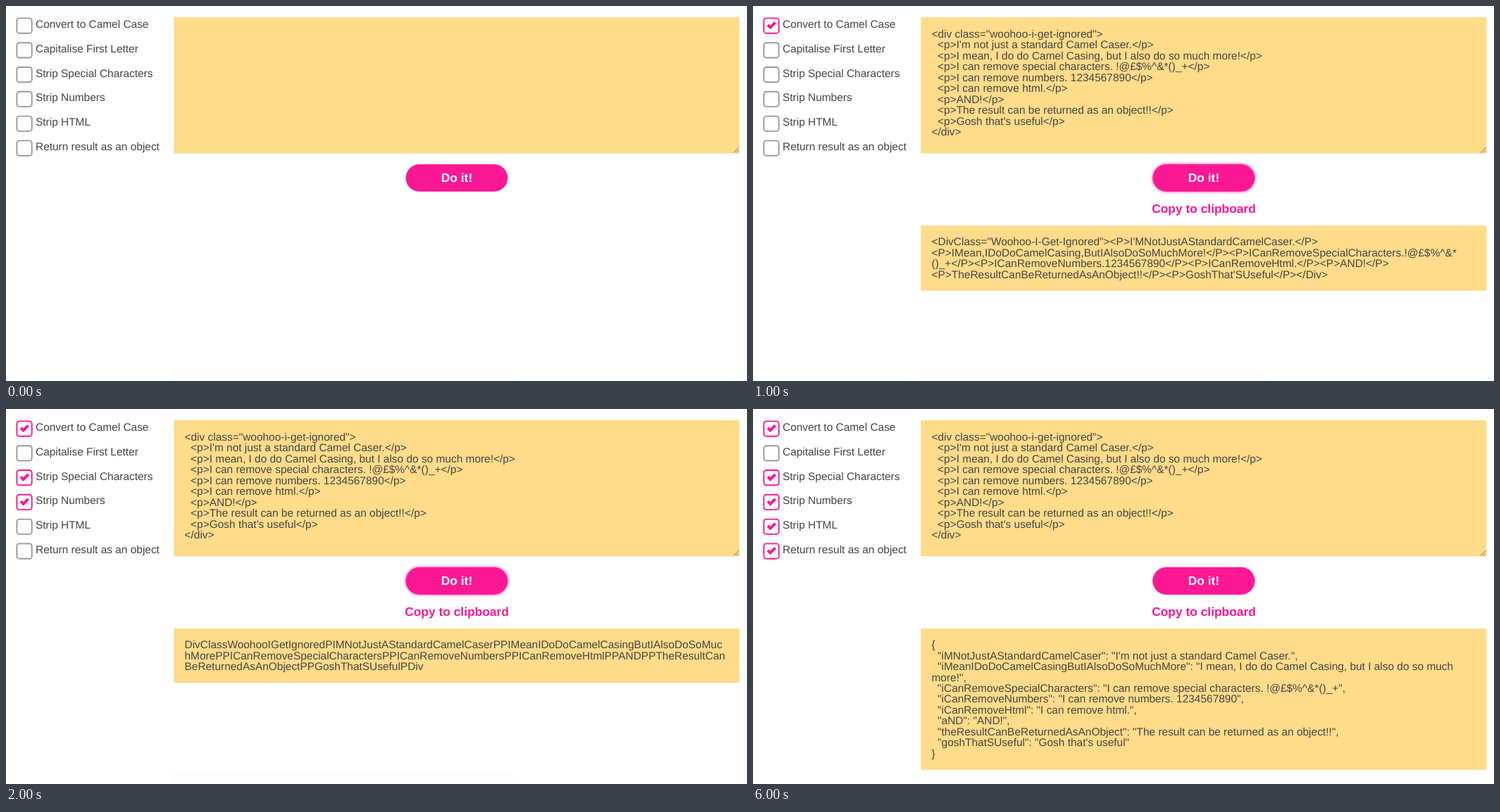
These frames come from a looping animation (1052x533 px, 8 s). An HTML page:

```html
<!DOCTYPE html>
<html lang="en">
<head>
<meta charset="utf-8">
<title>Camel case converter</title>
<style>
  html, body { margin: 0; width: 100%; height: 100%; overflow: hidden; background: #fff; }
  svg { display: block; }
  text {
    font: 15.45px "Liberation Sans", Arial, sans-serif;
    fill: #444; white-space: pre; text-rendering: geometricPrecision;
  }
  .bold { font-size: 17.38px; font-weight: bold; text-anchor: middle; }
  .panel { fill: #ffdb8a; }
  .box { fill: #fff; stroke: #999; stroke-width: 1.9; }
  .tick { fill: none; stroke: #fc1894; stroke-width: 4; visibility: hidden; }
  .on .box { stroke: #fc1894; }
  .on .tick { visibility: visible; }
</style>
</head>
<body>
<svg width="1052" height="533" viewBox="0 0 1052 533">
  <path fill="#fdfdfd" d="M235 517H714L737 532H235Z"/>
  <g id="options"></g>

  <rect class="panel" x="238.3" y="16" width="803" height="193.5"/>
  <path d="M1033 208.5l7-7M1037 208.5l3-3" stroke="#75684a"/>
  <g id="focus">
    <rect x="238" y="15.8" width="803.8" height="194" rx="1" fill="none"
          stroke="#ff58a8" stroke-width="2.8" style="filter:blur(.6px)"/>
    <path d="M297 171v16" stroke="#333"/>
  </g>
  <g id="input"></g>

  <rect id="button" x="567.5" y="225" width="144.8" height="38.7" rx="19.35" fill="#fc1894"/>
  <text class="bold" x="640" y="250" style="fill:#fff">Do it!</text>

  <g id="result">
    <text class="bold" x="640" y="293.5" style="fill:#fc1894">Copy to clipboard</text>
    <rect id="panel" class="panel" x="238.3" y="312" width="803"/>
    <g id="output"></g>
  </g>
</svg>
<script>
const LINE = 15.45, STEP = 500, LOOP = 8000;
const $ = id => document.getElementById(id);

const source = `<div class="woohoo-i-get-ignored">
  <p>I'm not just a standard Camel Caser.</p>
  <p>I mean, I do do Camel Casing, but I also do so much more!</p>
  <p>I can remove special characters. !@£$%^&*()_+</p>
  <p>I can remove numbers. 1234567890</p>
  <p>I can remove html.</p>
  <p>AND!</p>
  <p>The result can be returned as an object!!</p>
  <p>Gosh that's useful</p>
</div>`;

const camel = `<DivClass="Woohoo-I-Get-Ignored"><P>I'MNotJustAStandardCamelCaser.</P>
<P>IMean,IDoDoCamelCasing,ButIAlsoDoSoMuchMore!</P><P>ICanRemoveSpecialCharacters.!@£$%^&*
()_+</P><P>ICanRemoveNumbers.1234567890</P><P>ICanRemoveHtml.</P><P>AND!</P>
<P>TheResultCanBeReturnedAsAnObject!!</P><P>GoshThat'SUseful</P></Div>`;

const noSpecials = `DivClassWoohooIGetIgnoredPIMNotJustAStandardCamelCaserPPIMeanIDoDoCamelCasingButIAlsoDoSoMuc
hMorePPICanRemoveSpecialCharactersPPICanRemoveNumbers1234567890PPICanRemoveHtmlPPANDPPT
heResultCanBeReturnedAsAnObjectPPGoshThatSUsefulPDiv`;

const noNumbers = `DivClassWoohooIGetIgnoredPIMNotJustAStandardCamelCaserPPIMeanIDoDoCamelCasingButIAlsoDoSoMuc
hMorePPICanRemoveSpecialCharactersPPICanRemoveNumbersPPICanRemoveHtmlPPANDPPTheResultCan
BeReturnedAsAnObjectPPGoshThatSUsefulPDiv`;

const noHtml = `iMNotJustAStandardCamelCaserIMeanIDoDoCamelCasingButIAlsoDoSoMuchMoreICanRemoveSpecialCharact
ersICanRemoveNumbersICanRemoveHtmlANDTheResultCanBeReturnedAsAnObjectGoshThatSUseful`;

const asObject = `{
  "iMNotJustAStandardCamelCaser": "I'm not just a standard Camel Caser.",
  "iMeanIDoDoCamelCasingButIAlsoDoSoMuchMore": "I mean, I do do Camel Casing, but I also do so much
more!",
  "iCanRemoveSpecialCharacters": "I can remove special characters. !@£$%^&*()_+",
  "iCanRemoveNumbers": "I can remove numbers. 1234567890",
  "iCanRemoveHtml": "I can remove html.",
  "aND": "AND!",
  "theResultCanBeReturnedAsAnObject": "The result can be returned as an object!!",
  "goshThatSUseful": "Gosh that's useful"
}`;

// Each option and the step at which it gets ticked
const options = [
  ["Convert to Camel Case", 2],
  ["Capitalise First Letter", Infinity],
  ["Strip Special Characters", 3],
  ["Strip Numbers", 4],
  ["Strip HTML", 5],
  ["Return result as an object", 6],
];

// Text shown and strength of the button's glow at each step
const steps = [
  { input: "", output: "", glow: 0 },
  { input: source, output: "", glow: 0 },
  { input: source, output: camel, glow: 1 },
  { input: source, output: noSpecials, glow: .1 },
  { input: source, output: noNumbers, glow: 1 },
  { input: source, output: noHtml, glow: .25 },
  { input: source, output: asObject, glow: .45 },
];

const escapeText = s => s.replace(/&/g, "&amp;").replace(/</g, "&lt;");

function setLines(group, content, baseline) {
  group.innerHTML = content.split("\n").map((line, i) =>
    `<text x="253.5" y="${baseline + i * LINE}">${escapeText(line)}</text>`).join("");
}

$("options").innerHTML = options.map(([label], i) => `
  <g transform="translate(0 ${i * 34.8})">
    <rect class="box" x="15.4" y="17.4" width="21.3" height="21.3" rx="3.5"/>
    <path class="tick" d="M21 26.8l3.6 3.6 7-7"/>
    <text x="42" y="31">${label}</text>
  </g>`).join("");

function show(index) {
  const { input, output, glow } = steps[index];
  [...$("options").children].forEach((row, i) =>
    row.classList.toggle("on", index >= options[i][1]));
  $("focus").style.display = index === 1 ? "" : "none";
  $("result").style.display = output ? "" : "none";
  $("button").style.filter = glow
    ? `drop-shadow(0 0 ${2 * glow}px rgba(252,24,148,${.4 + .5 * glow}))` : "none";
  setLines($("input"), input, 45);
  setLines($("output"), output, 340.2);
  $("panel").setAttribute("height", (output.split("\n").length + 2) * LINE);
}

let current = -1;
function tick() {
  const index = Math.min(steps.length - 1, Math.floor(performance.now() % LOOP / STEP));
  if (index !== current) show(current = index);
  requestAnimationFrame(tick);
}
tick();
</script>
</body>
</html>
```
